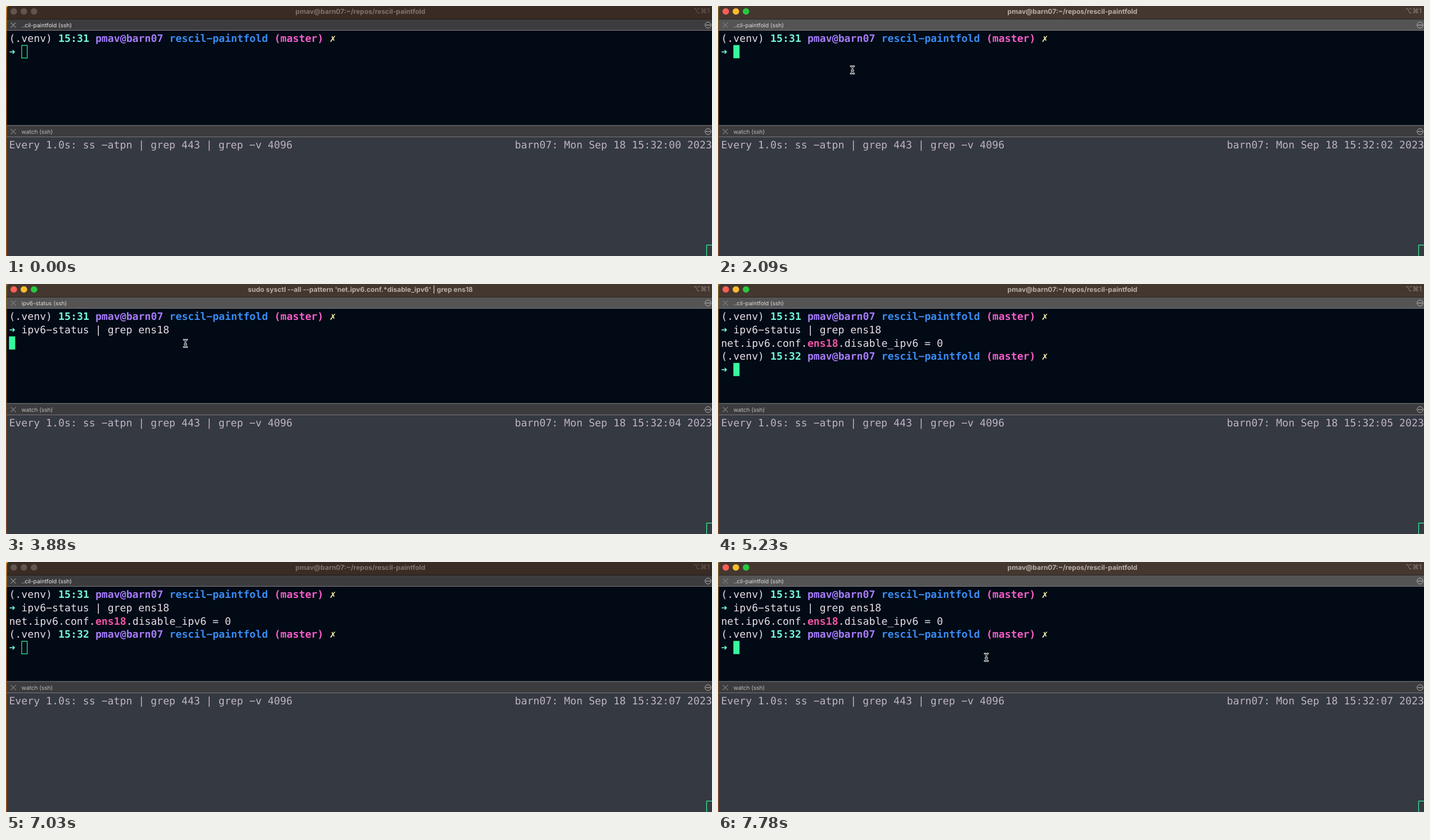
An HTML page that plays this animation: 1255 px wide and 446 px high, repeating every 8 s.

```html
<!DOCTYPE html>
<html lang="en">
<head>
<meta charset="utf-8">
<title>Terminal</title>
<style>
  html, body { margin: 0; width: 100%; height: 100%; overflow: hidden; background: #010a15; }
  svg { display: block; width: 100vw; height: 100vh; }
  text { white-space: pre; text-rendering: geometricPrecision; }
  .mono { font: 18.21px "DejaVu Sans Mono", monospace; }
  .ui { font-family: Inter, "DejaVu Sans", sans-serif; }
  .bold { font-weight: 700; }
</style>
</head>
<body>
<svg id="stage" viewBox="0 0 1255 446" preserveAspectRatio="none"></svg>
<script>
const LOOP = 8000;
const CELL = 10.965, ROW = 23.7, LEFT = 5.4, TOP = 46, BASE = 18.3;
const USER = 'pmav@barn07', PROJECT = 'rescil-paintfold';
const COMMAND = 'ipv6-status | grep ens18';
const RUNNING = "sudo sysctl --all --pattern 'net.ipv6.conf.*disable_ipv6' | grep ens18";
const GREEN = '#36f99e', PALE = '#e6dde8', MINT = '#74f9d8';

const TICKS = [1050, 1940, 2980, 3880, 4930, 5980, 7030];

// Pointer stops: start time, shape, x, y
const POINTER = [
  [0], [2090, 'beam', 239, 114], [2230, 'beam', 319, 106], [5230],
  [7180, 'arrow', 98, 232.5], [7330, 'arrow', 400.5, 261.5],
  [7480, 'arrow', 464, 209.5], [7630, 'arrow', 476, 169.5], [7780, 'beam', 477, 170]
];

const col = n => LEFT + n * CELL;
const rowTop = n => TOP + n * ROW;
const within = (t, from, to) => t >= from && t < to;
const escapeText = s => s.replace(/&/g, '&amp;').replace(/</g, '&lt;').replace(/>/g, '&gt;');

const rect = (x, y, w, h, fill) =>
  `<rect x="${x}" y="${y}" width="${w}" height="${h}" fill="${fill}"/>`;

const label = (x, y, size, fill, s, extra = '') =>
  `<text class="ui" x="${x}" y="${y}" font-size="${size}" fill="${fill}" ${extra}>${escapeText(s)}</text>`;

// The wide minus gives terminal hyphens their full-cell look
const mono = (c, y, s, fill, bold) =>
  `<text class="mono${bold ? ' bold' : ''}" x="${col(c)}" y="${y}" fill="${fill}">` +
  `${escapeText(s).replace(/-/g, '\u2212')}</text>`;

const line = (row, c, s, fill = PALE, bold = false) => mono(c, rowTop(row) + BASE, s, fill, bold);

function prompt(row, time) {
  const parts = [
    ['(.venv)', PALE], [time, MINT, true], [USER, '#a67cfa', true],
    [PROJECT, '#3a8cf4', true], ['(master)', '#f65dca', true], ['✗', '#f6f1a6', true]
  ];
  let c = 0, out = '';
  for (const [s, fill, bold] of parts) {
    out += line(row, c, s, fill, bold);
    c += s.length + 1;
  }
  return out + line(row + 1, 0, '➜', MINT, true);
}

function block(row, c, filled) {
  const x = col(c), y = rowTop(row);
  return filled
    ? rect(x, y, CELL, ROW - 0.2, GREEN)
    : `<rect x="${x + 0.6}" y="${y + 0.6}" width="${CELL - 1.2}" height="${ROW - 1.2}" fill="none" stroke="${GREEN}" stroke-width="1.2"/>`;
}

function tabBar(y, name, bg, ink, cross) {
  const mid = y + 10;
  const dots = [-2.7, 0, 2.7].map(d => `<circle cx="${1248 + d}" cy="${mid}" r=".9" fill="#c4c4c4"/>`).join('');
  return rect(1.5, y, 1253.5, 20, bg) +
    rect(1.5, y + 19, 1253.5, 1, '#7a7a7b') +
    `<path d="M8.5 ${mid - 4.5}l9 9m0-9l-9 9" stroke="${cross}" stroke-width="1.1"/>` +
    label(27.5, mid + 3.6, 10.1, ink, name) +
    `<circle cx="1248" cy="${mid}" r="5.3" fill="none" stroke="#b4b4b4"/>` + dots;
}

function titleBar(active, title) {
  const lights = active ? ['#ff5f57', '#febc2e', '#28c840'] : Array(3).fill('#62554f');
  return `<path d="M1.5 24V5Q1.5 0 6 0H1255V24Z" fill="${active ? '#44372f' : '#3a2b25'}"/>` +
    rect(1.5, 23, 1253.5, 1, active ? '#2b2420' : '#231a17') +
    lights.map((fill, i) => `<circle cx="${13.8 + 18 * i}" cy="9.7" r="5.8" fill="${fill}"/>`).join('') +
    label(630, 14, 12, active ? '#b9b0ab' : '#81756f', title, 'font-weight="700" text-anchor="middle"') +
    label(1251, 13.2, 12, active ? '#857a74' : '#655851', '⌥⌘1', 'font-weight="500" text-anchor="end"');
}

function edge(active) {
  const stops = active ? ['#8d6a2c', '#6d4a25', '#85482a'] : ['#e0a032', '#8f5c1e', '#a4521f'];
  return '<linearGradient id="edge" x2="0" y2="1">' +
    stops.map((c, i) => `<stop offset="${[0, 0.2, 1][i]}" stop-color="${c}"/>`).join('') +
    '</linearGradient>' + rect(0, 0, 8, 446, 'url(#edge)');
}

function shell(t, focused) {
  let out = prompt(0, '15:31');
  if (t < 2980) return out + block(1, 2, focused);
  if (t < 3880) {
    return out + rect(col(2), rowTop(1), COMMAND.length * CELL, ROW - 0.2, '#eadff1') +
      line(1, 2, COMMAND, '#0b1019') + block(1, 2 + COMMAND.length, true);
  }
  out += line(1, 2, COMMAND);
  if (t < 4030) return out + block(2, 0, true);
  return out + line(2, 0, 'net.ipv6.conf.') + line(2, 14, 'ens18', '#f353a4', true) +
    line(2, 19, '.disable_ipv6 = 0') + prompt(3, '15:32') + block(4, 2, focused);
}

function watch(t) {
  const sec = TICKS.filter(at => t >= at).length;
  const ink = '#bdb4c0', y = 254;
  return rect(1.5, 233, 1253.5, 213, '#353942') +
    mono(0, y, 'Every 1.0s: ss -atpn | grep 443 | grep -v 4096', ink) +
    mono(82, y, `${USER.split('@')[1]}: Mon Sep 18 15:32:0${sec} 2023`, ink) +
    `<rect x="1245.5" y="426.5" width="10.5" height="23" fill="none" stroke="${GREEN}" stroke-width="1.2"/>`;
}

function pointer(t) {
  const [, shape, x, y] = POINTER.filter(p => t >= p[0]).pop();
  if (!shape) return '';
  const at = `<g transform="translate(${x} ${y})" stroke-linejoin="round" stroke-linecap="round">`;
  if (shape === 'arrow') {
    return at + '<path d="M0 0V13.2L3 10.5 5.2 15.2 7.4 14.2 5.3 9.7H9.2Z" fill="#000" stroke="#fff" stroke-width="1.2"/></g>';
  }
  const d = 'M-3-6.5Q0-6.5 0-4Q0-6.5 3-6.5M0-4V4M-3 6.5Q0 6.5 0 4Q0 6.5 3 6.5M-1.5 1.5H1.5';
  return at + `<path d="${d}" fill="none" stroke="#fff" stroke-width="2.8"/>` +
    `<path d="${d}" fill="none" stroke="#000" stroke-width="1"/></g>`;
}

function scene(t) {
  const active = within(t, 2090, 5830) || t >= 7780;
  const focused = within(t, 2090, 5980) || t >= 7780;
  const running = within(t, 3880, 4030);
  const title = running ? RUNNING : `${USER}:~/repos/${PROJECT}`;
  const tab = (running ? 'ipv6-status' : '..' + PROJECT.slice(3)) + ' (ssh)';
  return edge(focused) + titleBar(active, title) +
    rect(1.5, 44, 1253.5, 169, '#010a15') +
    tabBar(24, tab, active ? '#545455' : '#3c3c3e', active ? '#dcdcdc' : '#e8e8e8', active ? '#7c7c7c' : '#8f8f8f') +
    shell(t, focused) + watch(t) +
    tabBar(214, 'watch (ssh)', '#3c3c3e', '#bebebe', '#7e7e7e') +
    rect(1.5, 212.5, 1253.5, 1.5, '#6a6a6b') + pointer(t);
}

const stage = document.getElementById('stage');
const start = performance.now();
let shown = '';

function update() {
  const markup = scene((performance.now() - start) % LOOP);
  if (markup !== shown) stage.innerHTML = shown = markup;
  requestAnimationFrame(update);
}
update();
</script>
</body>
</html>
```
